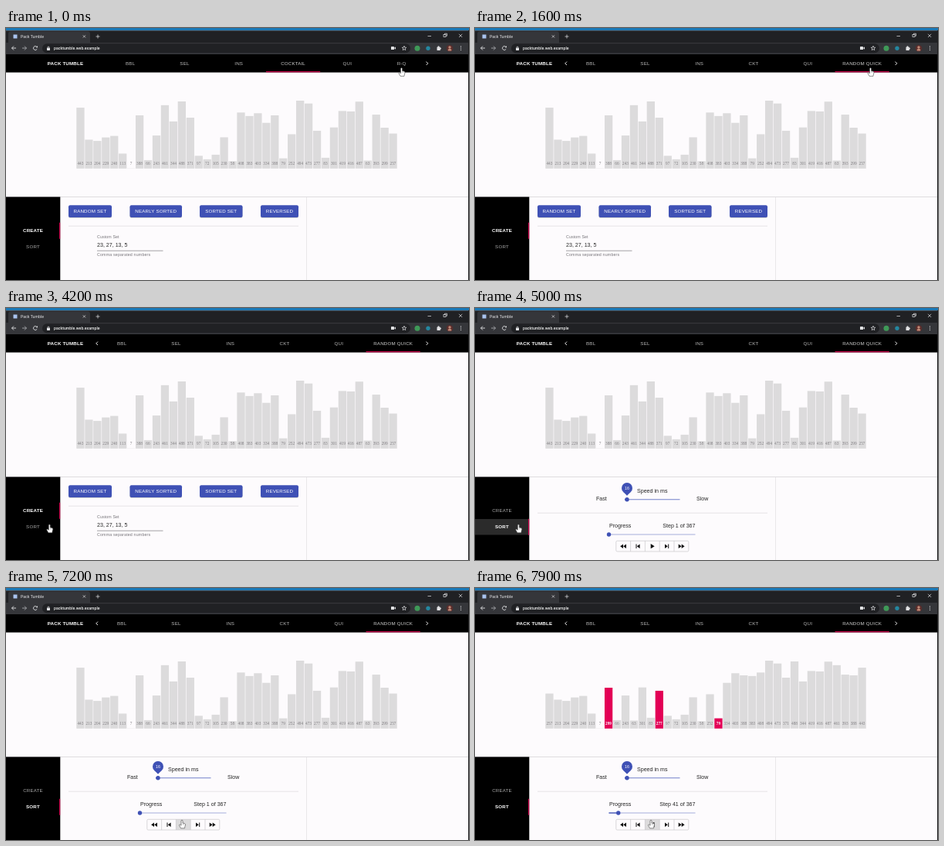
Animation of 600x326 px, one loop 8000 ms. Source, as an HTML page with a canvas:

```html
<!DOCTYPE html>
<html lang="en">
<head>
<meta charset="utf-8">
<title>Pack Tumble</title>
<style>
html, body { margin: 0; width: 100%; height: 100%; overflow: hidden; background: #fdfbfd; }
canvas { display: block; width: 600px; height: 326px; }
</style>
</head>
<body>
<canvas id="stage"></canvas>
<script>
const LOOP = 8000, W = 600, H = 326;
const BLUE = '#3f51b5', PINK = '#e30056', MARK = '#cf004c';
const SANS = '"Liberation Sans", Arial, sans-serif';
const UI = 'Roboto, sans-serif', SERIF = '"Liberation Serif", serif';
const CLICK_TAB = 100, CLICK_SORT = 4500, CLICK_PLAY = 7298, STEP_MS = 15, STEPS = 367;

const canvas = document.getElementById('stage');
const g = canvas.getContext('2d');
const dpr = window.devicePixelRatio || 1;
canvas.width = W * dpr;
canvas.height = H * dpr;

const START = [443, 213, 204, 229, 240, 113, 7, 388, 66, 243, 461, 344, 488, 371, 97, 72, 105, 230, 58,
  408, 383, 403, 334, 388, 79, 252, 494, 473, 277, 83, 301, 419, 416, 487, 63, 393, 299, 257];
const steps = buildSteps();

// Quick sort partitions; each exchange takes four steps.
function buildSteps() {
  const a = START.slice(), out = [];
  const push = (...lit) => out.push({ bars: a.slice(), lit });
  const partition = (lo, hi, at) => {
    const pivot = a[at];
    let i = lo, j = hi;
    push(at);
    for (;;) {
      while (a[i] < pivot) i++;
      while (a[j] > pivot) j--;
      if (i >= j) return;
      push(at, i, j);
      push(at, i, j);
      [a[i], a[j]] = [a[j], a[i]];
      if (at === i) at = j; else if (at === j) at = i;
      push(at, i, j);
      push(at);
      i++;
      j--;
    }
  };
  push();
  partition(0, 37, 22);
  push();
  partition(0, 21, 13);
  return out;
}

const clamp = v => Math.max(0, Math.min(1, v));
const ease = v => v * v * (3 - 2 * v);
const ramp = (t, from, to) => ease(clamp((t - from) / (to - from)));
const mix = (a, b, k) => a + (b - a) * k;

function rect(x, y, w, h, color, r = 0) {
  g.fillStyle = color;
  g.beginPath();
  g.roundRect(x, y, w, h, r);
  g.fill();
}

function dot(x, y, r, color) {
  g.fillStyle = color;
  g.beginPath();
  g.arc(x, y, r, 0, 7);
  g.fill();
}

function line(color, width, ...pts) {
  g.strokeStyle = color;
  g.lineWidth = width;
  g.beginPath();
  for (let i = 0; i < pts.length; i += 2) g.lineTo(pts[i], pts[i + 1]);
  g.stroke();
}

function poly(color, ...pts) {
  g.fillStyle = color;
  g.beginPath();
  for (let i = 0; i < pts.length; i += 2) g.lineTo(pts[i], pts[i + 1]);
  g.fill();
}

function text(s, x, y, size, color, { align = 'left', font = SANS, weight = 400, gap = 0 } = {}) {
  g.font = `${weight} ${size}px ${font}`;
  g.letterSpacing = gap + 'px';
  g.textAlign = align;
  g.fillStyle = color;
  g.fillText(s, x, y);
}

const caps = (s, x, y, color, weight = 400) =>
  text(s, x, y, 6.2, color, { align: 'center', gap: 0.17, weight });

function drawBrowser() {
  const light = '#e2e3e5';
  rect(0, 0, W, 3.2, '#1a78b6');
  rect(0, 3.2, W, 16, '#202124');
  rect(3, 4.5, 106, 15, '#35363a', [3, 3, 0, 0]);
  rect(0, 19, W, 15, '#35363a');
  rect(9.5, 8.5, 5, 5, '#a9c3ee');
  text('Pack Tumble', 19, 13, 5.2, '#e4e5e8', { font: UI });
  line(light, 0.7, 99.8, 9.3, 103, 12.5);
  line(light, 0.7, 103, 9.3, 99.8, 12.5);
  line(light, 0.7, 116.5, 11, 121.5, 11);
  line(light, 0.7, 119, 8.5, 119, 13.5);
  line(light, 0.7, 546.5, 10.5, 551, 10.5);
  g.strokeRect(567, 8.5, 3, 3);
  line(light, 0.7, 568.5, 8.5, 568.5, 7.2, 571.5, 7.2, 571.5, 10.2, 570, 10.2);
  line(light, 0.7, 587, 7.8, 591.2, 12);
  line(light, 0.7, 591.2, 7.8, 587, 12);

  line(light, 0.9, 13, 26, 7.5, 26);
  line(light, 0.9, 10, 23.5, 7.5, 26, 10, 28.5);
  line('#a8a9ad', 0.9, 21, 26, 26.5, 26);
  line('#a8a9ad', 0.9, 24, 23.5, 26.5, 26, 24, 28.5);
  g.strokeStyle = light;
  g.beginPath();
  g.arc(38, 26, 2.5, 0.5, 5.6);
  g.stroke();
  poly(light, 38.7, 25.2, 41, 25.2, 41, 22.9);

  rect(47, 20.3, 477, 12, '#202124', 6);
  rect(53, 25.6, 4, 3.3, light, 0.4);
  g.lineWidth = 0.7;
  g.beginPath();
  g.arc(55, 25.3, 1.2, Math.PI, 0);
  g.stroke();
  text('packtumble.web.example', 62, 28.1, 5.2, '#eceded', { font: UI, weight: 500 });
  rect(499, 24, 4, 4, light, 0.5);
  poly(light, 503, 26, 505, 24.2, 505, 27.8);
  g.lineWidth = 0.7;
  g.strokeStyle = light;
  g.beginPath();
  for (let i = 0; i < 10; i++) {
    const r = i % 2 ? 1.3 : 3, a = i * Math.PI / 5 - Math.PI / 2;
    g.lineTo(516 + r * Math.cos(a), 26.2 + r * Math.sin(a));
  }
  g.closePath();
  g.stroke();
  dot(533, 26.2, 3.5, '#3f9a58');
  dot(547, 26.2, 2.7, '#2487a0');
  rect(558.5, 24.6, 4.3, 4.3, light, 0.5);
  dot(560.5, 24.2, 1, light);
  dot(563, 26.6, 1, light);
  dot(575, 26.3, 4.2, '#5a2d2b');
  dot(575, 25, 1.7, '#c08a78');
  rect(572.6, 27.1, 4.8, 2.5, '#c08a78', [2, 2, 1, 1]);
  for (const y of [23.9, 26.1, 28.3]) dot(589.5, y, 0.6, light);
}

function drawNav(t) {
  rect(0, 34, W, 23.5, '#000');
  caps('PACK TUMBLE', 77, 48.3, '#fff', 700);
  const picked = t >= CLICK_TAB;
  const x0 = 126 - 11 * ramp(t, 300, 600), tabW = 70.3;
  const names = ['BBL', 'SEL', 'INS', picked ? 'CKT' : 'COCKTAIL', 'QUI', picked ? 'RANDOM QUICK' : 'R-Q'];
  g.save();
  g.beginPath();
  g.rect(126, 34, 411, 24);
  g.clip();
  names.forEach((s, i) => {
    const on = i === (picked ? 5 : 3);
    caps(s, x0 + (i + 0.5) * tabW, 48.3, on ? '#cfcfcf' : '#b9b9b9');
  });
  rect(x0 + tabW * mix(3, 5, ramp(t, 100, 400)), 56, tabW, 1.2, MARK);
  g.restore();
  line('#fff', 0.9, 544.6, 43.6, 546.8, 45.8, 544.6, 48);
  if (t > 300) line('#fff', 0.9, 119, 43.6, 116.8, 45.8, 119, 48);
}

function drawBars({ bars, lit }) {
  bars.forEach((v, i) => {
    const x = 91.3 + i * 10.95, h = v * 0.18 - 1, on = lit.includes(i);
    rect(x, 181.8 - h, 10.3, h, on ? PINK : '#dcdbdc');
    text(v, x + 5.1, 177.3, 5.3, on ? '#fff' : '#807e82',
      { align: 'center', font: SERIF, weight: on ? 700 : 400 });
  });
}

function drawSide(t) {
  rect(0, 218, W, 0.9, '#dfdde0');
  rect(389, 219, 0.8, 107, '#e4e2e5');
  rect(0, 218.6, 70.3, 108, '#000');
  const sort = t >= CLICK_SORT;
  const glow = ramp(t, 4500, 4700) * (1 - ramp(t, 5600, 5800));
  rect(0, 273, 70, 20.6, `rgba(255,255,255,${0.17 * glow})`);
  caps('CREATE', 35, 264.3, sort ? '#a9a9a9' : '#fff', sort ? 400 : 700);
  caps('SORT', 35, 285.4, sort ? '#fff' : '#a9a9a9', sort ? 700 : 400);
  rect(69, mix(251.7, 272.7, ramp(t, 4500, 4800)), 1.2, 21, MARK);
}

function drawCreate() {
  const buttons = [['RANDOM SET', 81, 56], ['NEARLY SORTED', 160.5, 67.5],
    ['SORTED SET', 251, 55.5], ['REVERSED', 330, 49]];
  for (const [s, x, w] of buttons) {
    rect(x, 230.2, w, 15.6, 'rgba(0,0,0,.22)', 2);
    rect(x, 229.3, w, 15.7, BLUE, 2);
    caps(s, x + w / 2, 239.4, '#fff', 500);
  }
  rect(81, 255.8, 298, 0.7, '#dddbde');
  text('Custom Set', 118, 272, 5.3, '#77757a', { gap: 0.1 });
  text('23, 27, 13, 5', 118, 283.4, 7.1, '#2a2a2a');
  rect(118, 287.8, 85.5, 0.7, '#858387');
  text('Comma separated numbers', 118, 295.3, 5.3, '#77757a', { gap: 0.16 });
}

function slider(x, y, w, at, rail) {
  rect(x, y - 0.5, w, 1, rail);
  rect(x, y - 0.6, at - x, 1.2, BLUE);
  dot(at, y, 2.7, BLUE);
}

function drawPlayer(t, step, running) {
  const ink = '#242424';
  g.save();
  // The panel glides up into place.
  g.translate(0, 12 * (1 - clamp((t - CLICK_SORT) / 600)));
  text('Speed in ms', 210, 236.8, 7.1, ink);
  text('Fast', 157, 247.3, 7.1, ink);
  text('Slow', 287, 247.3, 7.1, ink);
  slider(194, 245.7, 71.5, 197, '#727fca');
  dot(197, 230.9, 7, BLUE);
  poly(BLUE, 191.7, 235.4, 202.3, 235.4, 197, 240.8);
  text('16', 197, 232.9, 5.3, '#fff', { align: 'center' });
  rect(81, 262.8, 298, 0.7, '#dddbde');
  text('Progress', 174, 281.8, 7.1, ink);
  text(`Step ${step} of ${STEPS}`, 285.5, 281.8, 7.1, ink, { align: 'right' });
  slider(173.5, 291, 112, 173.5 + (step - 1) / (STEPS - 1) * 112, '#a5addc');

  rect(220.3, 299.3, 18.8, 13.7, `rgba(0,0,0,${0.13 * ramp(t, 6300, 6600)})`);
  g.strokeStyle = '#c9c7ca';
  g.lineWidth = 0.7;
  g.beginPath();
  g.roundRect(182.8, 299.3, 94, 13.7, 1.5);
  g.stroke();
  for (let i = 1; i < 5; i++) line('#c9c7ca', 0.7, 182.8 + i * 18.8, 299.3, 182.8 + i * 18.8, 313);
  const y = 306.2;
  const arrow = (x, d, h = 2.7) => poly('#111', x, y - h, x + d, y, x, y + h);
  arrow(192, -3.9);
  arrow(196, -3.9);
  arrow(213.6, -3.8);
  rect(208.5, y - 2.7, 1, 5.4, '#111');
  if (running) {
    rect(227.3, y - 3, 1.7, 6, '#111');
    rect(230.8, y - 3, 1.7, 6, '#111');
  } else {
    arrow(227.7, 5, 3.1);
  }
  arrow(246, 3.8);
  rect(250.2, y - 2.7, 1, 5.4, '#111');
  arrow(263.7, 3.9);
  arrow(267.7, 3.9);
  g.restore();
}

const PATH = [[0, 512.5, 51.5], [1600, 512.5, 51.5], [2200, 160, 301], [3200, 160, 301], [3500, 100, 278],
  [3700, 100, 278], [4200, 56.3, 280], [5600, 56.3, 280], [6300, 225.8, 295.5], [6450, 225.8, 295.5],
  [6700, 228, 300], [LOOP, 228, 300]];
const HAND = new Path2D('M-1 .8Q0 -.6 1 .8L1 4L3.6 4.6Q4.6 5 4.5 6.5L3.9 8.6L3.5 10.8L-1.4 10.8' +
  'L-3.4 7.3Q-3.8 6 -2.6 6.1L-1 7.2Z');
const ARROW = new Path2D('M0 0L0 8.6L2 6.8L3.3 9.8L4.6 9.2L3.3 6.4L6 6.2Z');

function drawCursor(t) {
  const i = PATH.findIndex(p => p[0] > t);
  const [t0, x0, y0] = PATH[i - 1], [t1, x1, y1] = PATH[i];
  const k = ramp(t, t0, t1), x = mix(x0, x1, k), y = mix(y0, y1, k);
  const overTabs = y < 58, overSide = x < 70 && y > 251 && y < 295;
  const overPlayer = t > CLICK_SORT && x > 183 && y > 294;
  g.save();
  g.translate(x, y);
  const shape = overTabs || overSide || overPlayer ? HAND : ARROW;
  g.fillStyle = '#fff';
  g.strokeStyle = '#444';
  g.lineWidth = 0.6;
  g.fill(shape);
  g.stroke(shape);
  if (shape === HAND) {
    line('#777', 0.4, 1.1, 4.5, 1.1, 6.5);
    line('#777', 0.4, 2.6, 4.8, 2.6, 6.6);
  }
  g.restore();
}

function draw(t) {
  g.setTransform(dpr, 0, 0, dpr, 0, 0);
  rect(0, 0, W, H, '#fdfbfd');
  const running = t >= CLICK_PLAY;
  const step = running ? 1 + Math.floor((t - CLICK_PLAY) / STEP_MS) : 1;
  drawBrowser();
  drawNav(t);
  drawBars(steps[Math.min(step, steps.length) - 1]);
  drawSide(t);
  if (t < CLICK_SORT) drawCreate();
  else drawPlayer(t, step, running);
  rect(W - 1, 3, 1, H - 3, '#1c1c1e');
  drawCursor(t);
}

const begin = performance.now();
function tick() {
  draw((performance.now() - begin) % LOOP);
  requestAnimationFrame(tick);
}
tick();
</script>
</body>
</html>
```
